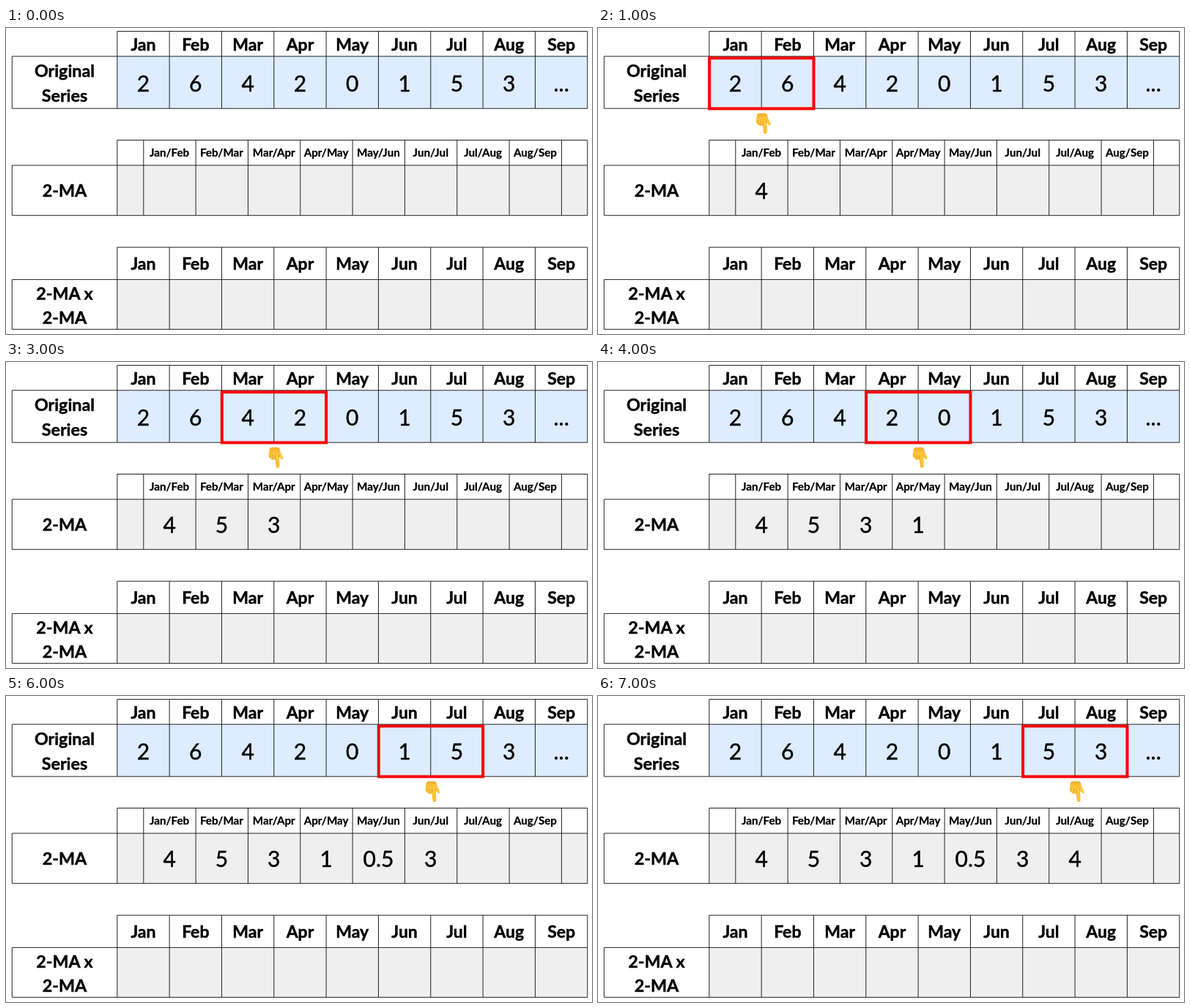
An HTML page that plays this animation: 800x419 px, repeating every 8000 ms.

```html
<!DOCTYPE html>
<html lang="en">
<head>
<meta charset="utf-8">
<title>Moving averages</title>
<style>
html, body { margin: 0; width: 100%; height: 100%; overflow: hidden; background: #fff; }
svg { display: block; width: 800px; height: 419px; }
text { font-family: Lato, Carlito, sans-serif; text-anchor: middle; fill: #000; stroke: #000; stroke-width: .45; }
.head, .label, .pair { font-weight: 700; }
.head { font-size: 23px; }
.label { font-size: 23.3px; }
.pair { font-size: 15.2px; stroke-width: .25; }
.num { font-size: 30px; }
.grid { stroke: #222; stroke-width: 1; fill: none; }
</style>
</head>
<body>
<svg viewBox="0 0 800 419">
  <defs>
    <linearGradient id="skin" x1="0" y1="0" x2="0" y2="1">
      <stop offset="0" stop-color="#f7ad2b"/>
      <stop offset=".4" stop-color="#ffcb42"/>
      <stop offset="1" stop-color="#fdb932"/>
    </linearGradient>
  </defs>
  <g id="table"></g>
  <g id="results"></g>
  <g id="pointer">
    <rect x=".3" y="41.2" width="142.4" height="69.2" fill="none" stroke="#f80000" stroke-width="4"/>
    <g transform="translate(71.4 116)">
      <path fill="url(#skin)" d="M-6 2.5Q-5 .7 -2 .7H4Q7 .7 7.8 3L9 8Q12 12 12.5 16
        Q12.2 18 10.5 17.4L7.2 14L7.5 26.8Q7.3 29.2 5.2 29.2Q3 29.2 2.7 26.8L1.5 17
        Q-.7 19.4 -2.4 17.2Q-5 17.8 -5.6 15Q-8 13.8 -7.4 10.5Z"/>
      <path fill="none" stroke="#d98a1a" stroke-width=".8" stroke-linecap="round"
        d="M-5.5 14.6L-4.6 10.5M-2.3 16.8L-1.4 11M1.6 17L1.8 11.5M7.2 14L6.2 11"/>
    </g>
  </g>
</svg>
<script>
const NS = "http://www.w3.org/2000/svg";
const LEFT = 151.8, COL = 71.33, INSET = 36, EDGE = 8.3, STEP = 1000, STEPS = 8;
const RIGHT = LEFT + 9 * COL;
const months = "Jan Feb Mar Apr May Jun Jul Aug Sep".split(" ");
const series = [2, 6, 4, 2, 0, 1, 5, 3];
const table = document.getElementById("table");
const results = document.getElementById("results");
const pointer = document.getElementById("pointer");

function add(parent, name, attrs, content = "") {
  const el = document.createElementNS(NS, name);
  for (const key in attrs) el.setAttribute(key, attrs[key]);
  el.textContent = content;
  return parent.appendChild(el);
}
const write = (content, x, y, cls, parent = table) =>
  add(parent, "text", { x, y, class: cls }, content);

// One block: a header row, a body row and a label cell to the left.
function block(top, mid, bottom, fill, edges) {
  add(table, "rect", { x: LEFT, y: mid, width: RIGHT - LEFT, height: bottom - mid, fill });
  let d = `M${LEFT} ${top}H${RIGHT}M${EDGE} ${mid}H${RIGHT}M${EDGE} ${bottom}H${RIGHT}M${EDGE} ${mid}V${bottom}`;
  for (const x of edges) d += `M${x} ${top}V${bottom}`;
  add(table, "path", { d, class: "grid" });
}

const columns = [...months.map((_, i) => LEFT + i * COL), RIGHT];
const shifted = [LEFT, ...months.map((_, i) => LEFT + INSET + i * COL), RIGHT];
block(4.5, 38.8, 110.2, "#ddecfe", columns);
block(153.5, 188, 256.7, "#efefef", shifted);
block(300.2, 344.4, 412.6, "#efefef", columns);

months.forEach((month, i) => {
  const x = LEFT + (i + 0.5) * COL;
  write(month, x, 30.5, "head");
  write(month, x, 331, "head");
  write(i < series.length ? series[i] : "...", x, 87, "num");
  if (i < 8) write(month + "/" + months[i + 1], x + COL / 2, 176.3, "pair");
});
[["Original", 67], ["Series", 100.5], ["2-MA", 231], ["2-MA x", 371.5], ["2-MA", 405]]
  .forEach(([label, y]) => write(label, 80, y, "label"));

const averages = series.slice(1).map((v, i) =>
  write((series[i] + v) / 2, LEFT + (i + 1) * COL, 234, "num", results));

function draw(now) {
  const step = Math.floor(now / STEP) % STEPS;
  averages.forEach((el, i) => el.setAttribute("visibility", i < step ? "visible" : "hidden"));
  pointer.setAttribute("visibility", step ? "visible" : "hidden");
  pointer.setAttribute("transform", `translate(${LEFT + (step - 1) * COL} 0)`);
}

const start = performance.now();
function tick() {
  draw(performance.now() - start);
  requestAnimationFrame(tick);
}
tick();
</script>
</body>
</html>
```
